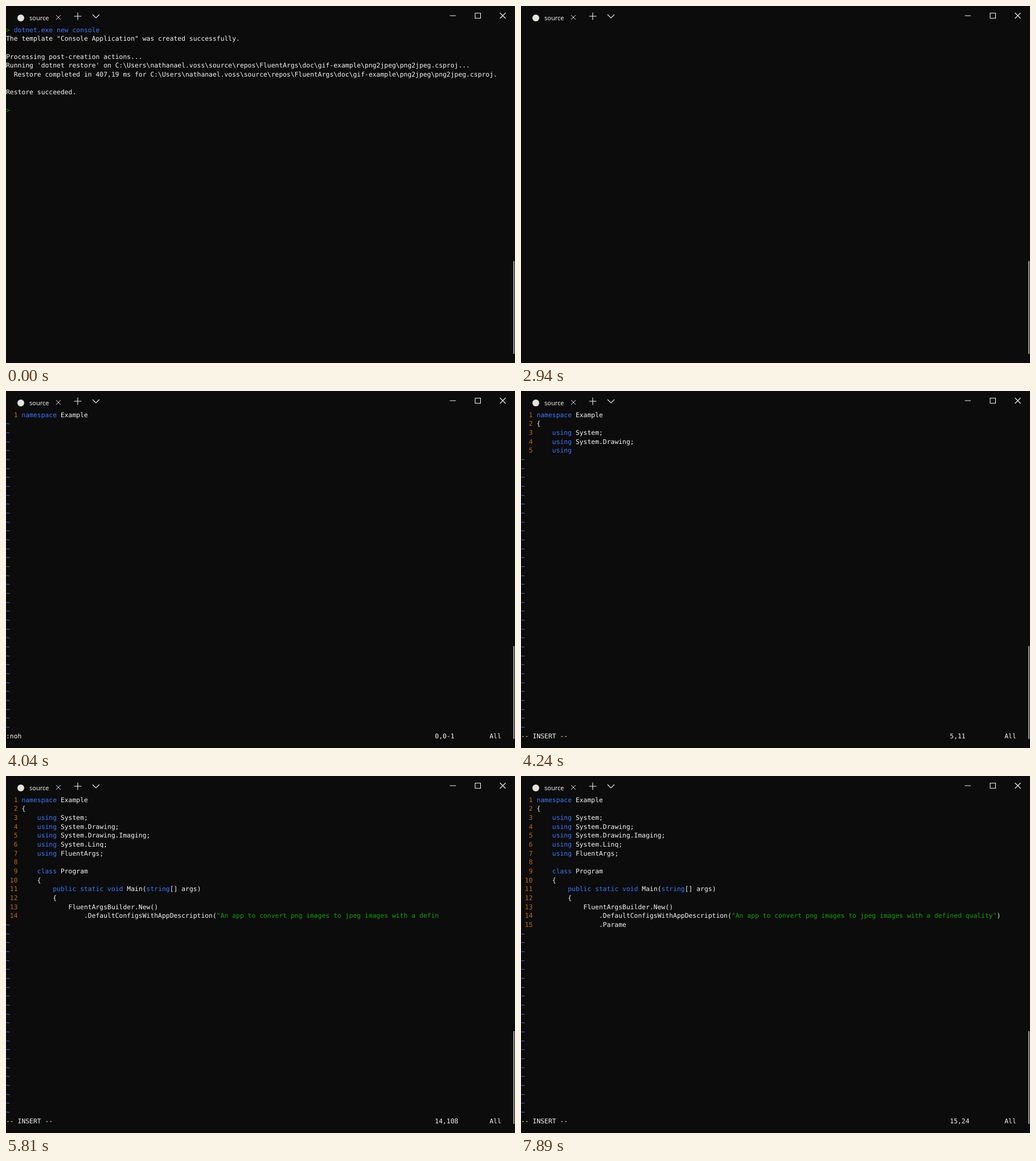
These frames come from a looping animation (894x627 px, 8000 ms). An HTML page:

```html
<!DOCTYPE html>
<html lang="en">
<head>
<meta charset="utf-8">
<title>Terminal</title>
<style>
  html, body { margin: 0; width: 100%; height: 100%; overflow: hidden; background: #0c0c0c; }
  svg, pre, #cursor { position: absolute; left: 0; top: 0; }
  pre {
    margin: 0; top: 34.5px; color: #f5f5f5;
    font: 11.39px/15.67px "DejaVu Sans Mono", monospace;
    text-rendering: geometricPrecision; font-variant-ligatures: none;
  }
  #cursor { width: 1.6px; height: 15.67px; background: #fff; }
  .b { color: #3b78ff; }
  .g { color: #13a10e; }
  .n { color: #c2690a; }
</style>
</head>
<body>
<svg width="894" height="627" fill="none" stroke="#f2f2f2" stroke-width="1.1">
  <circle cx="26" cy="21" r="6" fill="#e6e3da" stroke="none"/>
  <text x="41" y="25" fill="#fff" stroke="none" font-size="11" font-family="'Open Sans', sans-serif">source</text>
  <path d="M88 16l8 8m0-8l-8 8" stroke-width=".9"/>
  <path d="M119.5 18h13M126 11.5v13M152 15l6 6 6-6M779.5 17h10.5M824 12.500h9.500v9h-9.500zM867.500 12l10 10m0-10l-10 10"/>
  <path d="M892 448v163" stroke="#a0a0a0" stroke-width="2"/>
</svg>
<pre id="screen"></pre>
<div id="cursor"></div>
<script>
const LOOP = 8000, COL = 6.857, ROW = 15.67, TOP = 34.5, ROWS = 37;
const screenEl = document.getElementById("screen");
const cursorEl = document.getElementById("cursor");

const project = String.raw`C:\Users\nathanael.voss\source\repos\FluentArgs\doc\gif-example\png2jpeg\png2jpeg.csproj`;
const shellLines = [
  paint("g", "&gt;") + paint("b", " dotnet.exe new console"),
  'The template "Console Application" was created successfully.',
  "",
  "Processing post-creation actions...",
  `Running 'dotnet restore' on ${project}...`,
  `  Restore completed in 407,19 ms for ${project}.`,
  "",
  "Restore succeeded.",
  "",
  paint("g", "&gt;")
];

const doc = `namespace Example
{
    using System;
    using System.Drawing;
    using System.Drawing.Imaging;
    using System.Linq;
    using FluentArgs;

    class Program
    {
        public static void Main(string[] args)
        {
            FluentArgsBuilder.New()
                .DefaultConfigsWithAppDescription("An app to convert png images to jpeg images with a defined quality")
                .Parame`;
const docLines = doc.split("\n");
const firstLine = docLines[0].length;

// Number of characters typed when the caret stands at line, column (1-based)
function offset(line, column) {
  return docLines.slice(0, line - 1).join("\n").length + column;
}

const shell = (t, typed, cursor) => ({ t, mode: "shell", typed, cursor });
const vim = (t, typed, status, ruler, cursor) => ({ t, mode: "vim", typed, status, ruler, cursor });
const insert = (t, line, column, cursor, ruler) =>
  vim(t, offset(line, column), "-- INSERT --", ruler, cursor);

const fillEnd = offset(14, 97);
const fill = [4240, 4360, 4470, 4590, 4710, 4820].map((t, i) =>
  vim(t, Math.round(firstLine + (fillEnd - firstLine) * (i + 1) / 6), "-- INSERT --", undefined, i === 5));

const typing = [
  [5030, 98], [5130, 99], [5360, 102], [5470, 105, true],
  [5700, 107], [5810, 108], [5920, 110], [6030, 111], [6140, 113], [6250, 114], [6360, 116],
  [6530, 118], [6590, 119]
].map(([t, column, cursor]) => insert(t, 14, column, cursor));

const states = [
  shell(0, false), shell(110, true),
  ...[320, 650, 1190, 1750, 2300].map((t, i) => shell(t, true, i % 2 === 0)),
  { t: 2830, mode: "blank" },
  vim(3070, 0, "", "0,0-1"),
  vim(3610, 0, ":", ""),
  vim(3830, 0, ":noh", ""),
  vim(3940, 0, ":noh", "0,0-1"),
  vim(4040, firstLine, ":noh", "0,0-1"),
  ...fill, ...typing,
  insert(6790, 14, 120, true, "14,119"),
  insert(7020, 15, 1, true),
  insert(7350, 15, 21),
  insert(7660, 15, 22), insert(7770, 15, 23), insert(7890, 15, 24)
];

function paint(cls, text) {
  return `<span class="${cls}">${text}</span>`;
}

function highlight(code) {
  return code.replace(/"[^"]*"?|\b(namespace|using|class|public|static|void|string)\b/g,
    part => paint(part[0] === '"' ? "g" : "b", part));
}

function drawShell({ typed }) {
  return { html: shellLines.join("\n") + (typed ? paint("b", " vim Program.cs") : ""), row: 10, col: 0 };
}

function drawVim({ typed, status, ruler }) {
  const lines = doc.slice(0, typed).split("\n");
  const last = lines.length, column = lines[last - 1].length + 1;
  const rows = lines.map((line, i) => paint("n", String(i + 1).padStart(3)) + " " + highlight(line));
  while (rows.length < ROWS - 1) rows.push(paint("b", "~"));
  ruler ??= `${last},${column}`;
  rows.push(status.padEnd(110) + (ruler && ruler.padEnd(14) + "All"));
  return { html: rows.join("\n"), row: last - 1, col: column + 3 };
}

const draw = { shell: drawShell, vim: drawVim, blank: () => ({ html: "", row: 0, col: 0 }) };
let shown;

function frame(now) {
  const t = now % LOOP;
  const state = states.findLast(s => s.t <= t) || states[0];
  if (state !== shown) {
    shown = state;
    const { html, row, col } = draw[state.mode](state);
    screenEl.innerHTML = html;
    cursorEl.style.display = state.cursor ? "block" : "none";
    cursorEl.style.transform = `translate(${col * COL}px, ${TOP + row * ROW}px)`;
  }
  requestAnimationFrame(frame);
}
frame(0);
</script>
</body>
</html>
```
